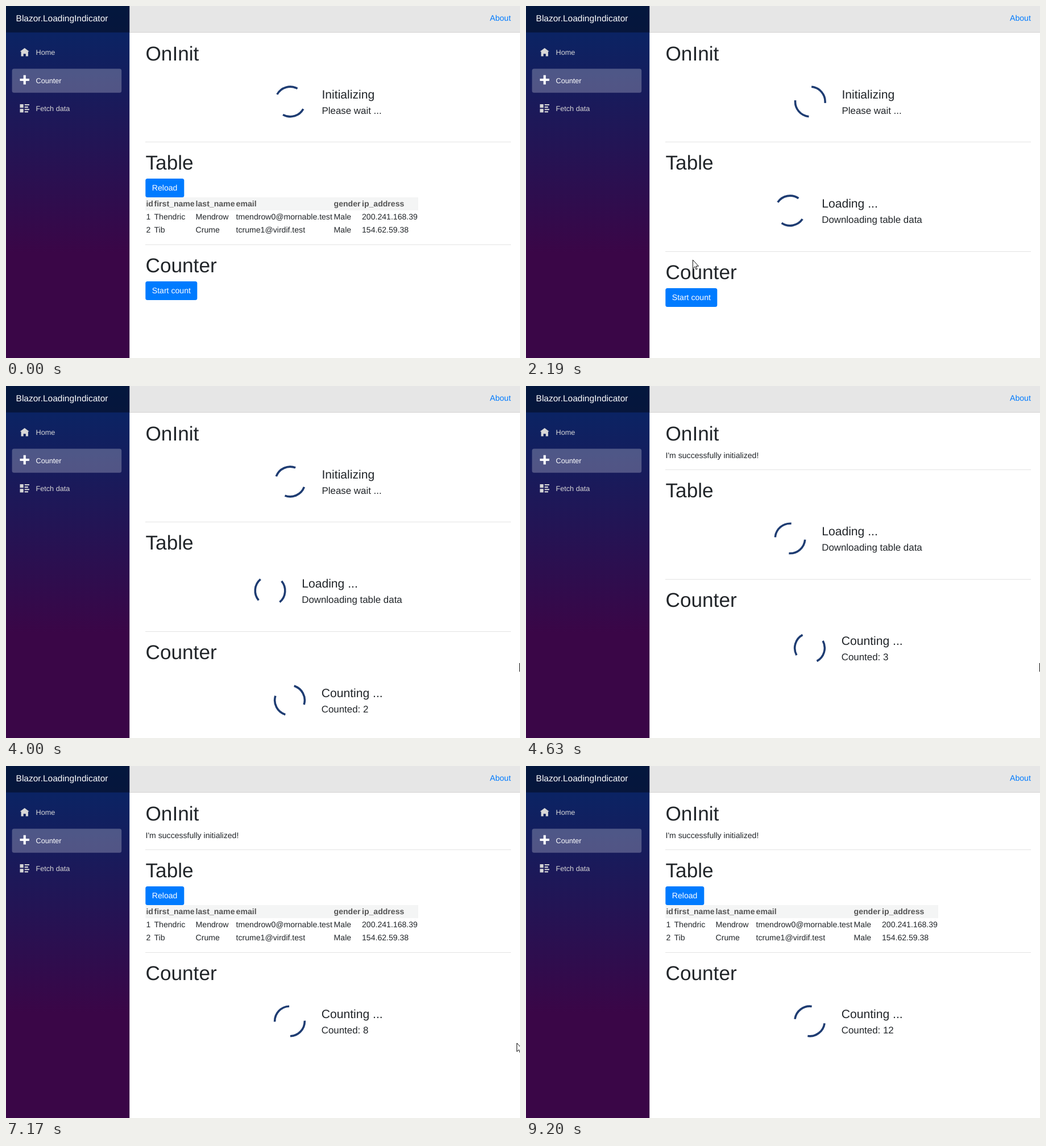
Write an HTML page that moves like this. It is 904 by 620 pixels and loops after 9280 ms.

```html
<!DOCTYPE html>
<html lang="en">
<head>
<meta charset="utf-8">
<title>Loading indicators</title>
<style>
  html, body { margin: 0; width: 100%; height: 100%; overflow: hidden; background: #fff; }
  svg { display: block; width: 904px; height: 620px; }
  text {
    font: 14.08px "Liberation Sans", Arial, sans-serif;
    fill: #212529; white-space: pre; text-rendering: geometricPrecision;
  }
  .brand { font-size: 15.49px; fill: #fff; }
  .nav { font-size: 12.67px; fill: #d7d7d7; }
  .icon { fill: #d7d7d7; }
  .active { fill: #fff; }
  .link { fill: #007bff; }
  .h1 { font-size: 35.2px; }
  .title { font-size: 21.12px; }
  .note { font-size: 16.9px; }
  .head { font-weight: bold; fill: #555; }
  .button rect { fill: #007bff; }
  .button.hover rect { fill: #006ce0; }
  .button text { fill: #fff; }
  .rule { fill: #e3e3e3; }
  .ring { fill: none; stroke: #1e3c72; stroke-width: 3.6; }
  .cursor path { fill: #fff; stroke: #000; stroke-width: .95; stroke-linejoin: round; }
</style>
</head>
<body>
<svg viewBox="0 0 904 620">
  <defs>
    <linearGradient id="night" x2="0" y2="1">
      <stop stop-color="#052767"/><stop offset=".7" stop-color="#3a0647"/>
    </linearGradient>
  </defs>

  <rect x="217" width="687" height="46" fill="#e6e6e6"/>
  <rect x="217" y="46" width="687" height="1" fill="#d6d5d5"/>
  <text class="link" x="851" y="26">About</text>

  <rect width="217.2" height="620" fill="url(#night)"/>
  <rect width="217.2" height="46.6" fill-opacity=".4"/>
  <text class="brand" x="17.6" y="27">Blazor.LoadingIndicator</text>
  <rect x="10.6" y="110.4" width="192.6" height="42.4" rx="3.5" fill="#fff" fill-opacity=".25"/>
  <path class="icon" transform="translate(24.5 74) scale(2.06)" d="M4 0L0 3h1v4h2V5h2v2h2V3h1z"/>
  <path class="icon active" transform="translate(24.5 121.8) scale(2.06)" d="M3 0v3H0v2h3v3h2V5h3V3H5V0z"/>
  <path class="icon" transform="translate(24.5 173) scale(2.06)"
    d="M0 0h3v3H0zM4 0h4v1H4zM4 2h3v1H4zM0 4h3v3H0zM4 4h4v1H4zM4 6h3v1H4z"/>
  <text class="nav" x="52.5" y="86">Home</text>
  <text class="nav active" x="52.5" y="136">Counter</text>
  <text class="nav" x="52.5" y="185">Fetch data</text>

  <!-- Each section has its origin on the heading's baseline. -->
  <g id="init">
    <text class="h1" x="245.5">OnInit</text>
    <text class="done" x="245.5" y="31">I'm successfully initialized!</text>
  </g>
  <g id="table">
    <rect class="rule" x="245" y="-49" width="643" height="1"/>
    <text class="h1" x="245.5">Table</text>
    <g class="done">
      <g class="button">
        <rect x="245.3" y="16" width="68" height="33" rx="3.5"/>
        <text x="256.8" y="37">Reload</text>
      </g>
      <rect x="245.3" y="49" width="479.7" height="23" fill="#f4f5f5"/>
    </g>
  </g>
  <g id="counter">
    <rect class="rule" x="245" y="-49" width="643" height="1"/>
    <text class="h1" x="245.5">Counter</text>
    <g class="done button">
      <rect x="245.3" y="16" width="91" height="33" rx="3.5"/>
      <text x="256.8" y="37">Start count</text>
    </g>
  </g>

  <g id="cursor" class="cursor">
    <path id="arrow" d="M.5 0V15L4 11.8 6.2 17 8.3 16.1 6.1 11H10.6Z"/>
    <path id="hand" d="M-1.6 10V1.2a1.6 1.6 0 0 1 3.2 0V6.5q1.4-1 2.7.3 1.4-.7 2.6.5 1.8-.2 2 1.7v4q0 2.2-1.6 5H-.6q-1-3-4.2-6.2-1.4-2 .2-2.7 1.2-.2 3 2.4z"/>
  </g>
</svg>
<script>
const LOOP = 9280, STEP = LOOP / 119;
const INIT_DONE = 4550, RELOAD = 1713, TABLE_DONE = 4730, COUNT_START = 2805, COUNT_EVERY = 515;
const byId = id => document.getElementById(id);
const show = (node, on) => node.setAttribute('display', on ? 'inline' : 'none');

function add(parent, tag, attributes, content = '') {
  const node = document.createElementNS('http://www.w3.org/2000/svg', tag);
  for (const name in attributes) node.setAttribute(name, attributes[name]);
  node.textContent = content;
  return parent.appendChild(node);
}

const columns = [246.4, 260.5, 333.6, 404.6, 576.6, 626];
const rows = [
  ['id', 'first_name', 'last_name', 'email', 'gender', 'ip_address'],
  ['1', 'Thendric', 'Mendrow', 'tmendrow0@mornable.test', 'Male', '200.241.168.39'],
  ['2', 'Tib', 'Crume', 'tcrume1@virdif.test', 'Male', '154.62.59.38']
];
const tableBody = byId('table').querySelector('.done');
rows.forEach((row, r) => row.forEach((cell, c) =>
  add(tableBody, 'text', { x: columns[c], y: 65 + r * 23, class: r ? '' : 'head' }, cell)));

// A section swaps its content for two turning quarter arcs and two lines of text.
function makeSection(id, x, title, note, phase) {
  const group = byId(id);
  const loader = add(group, 'g', {});
  const ring = add(loader, 'path', { class: 'ring',
    d: 'M18.6-18.6A26.3 26.3 0 0 1 18.6 18.6M-18.6 18.6A26.3 26.3 0 0 1-18.6-18.6' });
  add(loader, 'text', { class: 'title', x: x + 55.7, y: 67 }, title);
  const noteText = add(loader, 'text', { class: 'note', x: x + 55.7, y: 94 }, note);
  const done = group.querySelector('.done'), button = group.querySelector('.button');
  return {
    noteText, button,
    update(t, y, loading) {
      group.setAttribute('transform', `translate(0 ${y})`);
      show(loader, loading);
      show(done, !loading);
      ring.setAttribute('transform', `translate(${x} 72.5) rotate(${phase + t * .36})`);
    }
  };
}
const init = makeSection('init', 499.8, 'Initializing', 'Please wait ...', 74);
const table = makeSection('table', 464.5, 'Loading ...', 'Downloading table data', 90 - RELOAD * .36);
const counter = makeSection('counter', 499, 'Counting ...', '', 90 - COUNT_START * .36);

// Pointer stops: time, x, y
const path = [
  [300, 800, 628], [936, 296, 350], [1250, 280.5, 325], [1760, 280.5, 325],
  [2450, 299, 508], [2885, 299, 508], [2963, 342, 492], [3600, 903, 488],
  [6780, 903, 488], [7000, 898, 488], [7780, 898, 488], [8150, 899, 577], [8300, 908, 577]
];
function pointerAt(t) {
  const i = path.findIndex(stop => stop[0] > t);
  if (i < 1) return [-50, -50];
  const [t0, x0, y0] = path[i - 1], [t1, x1, y1] = path[i];
  const u = (t - t0) / (t1 - t0), k = u * u * (3 - 2 * u);
  return [x0 + (x1 - x0) * k, y0 + (y1 - y0) * k];
}

function draw(now) {
  const t = Math.floor((now % LOOP + 10) / STEP) % 119 * STEP;
  const initLoading = t < INIT_DONE;
  const tableLoading = t >= RELOAD && t < TABLE_DONE;
  const counting = t >= COUNT_START;
  const tableY = initLoading ? 288 : 196;
  const counterY = tableY + (tableLoading ? 193 : 181);

  init.update(t, 96, initLoading);
  table.update(t, tableY, tableLoading);
  counter.update(t, counterY, counting);
  counter.noteText.textContent = 'Counted: ' + Math.max(0, Math.floor((t - COUNT_START) / COUNT_EVERY));

  const [x, y] = pointerAt(t);
  const over = (top, width) => x > 245 && x < 245 + width && y > top + 16 && y < top + 49;
  const onReload = !tableLoading && over(tableY, 68);
  const onStart = !counting && over(counterY, 91);
  table.button.classList.toggle('hover', onReload);
  counter.button.classList.toggle('hover', onStart);
  byId('cursor').setAttribute('transform', `translate(${x} ${y})`);
  show(byId('hand'), onReload || onStart);
  show(byId('arrow'), !(onReload || onStart));
}

const start = performance.now();
function tick() {
  draw(performance.now() - start);
  requestAnimationFrame(tick);
}
tick();
</script>
</body>
</html>
```
